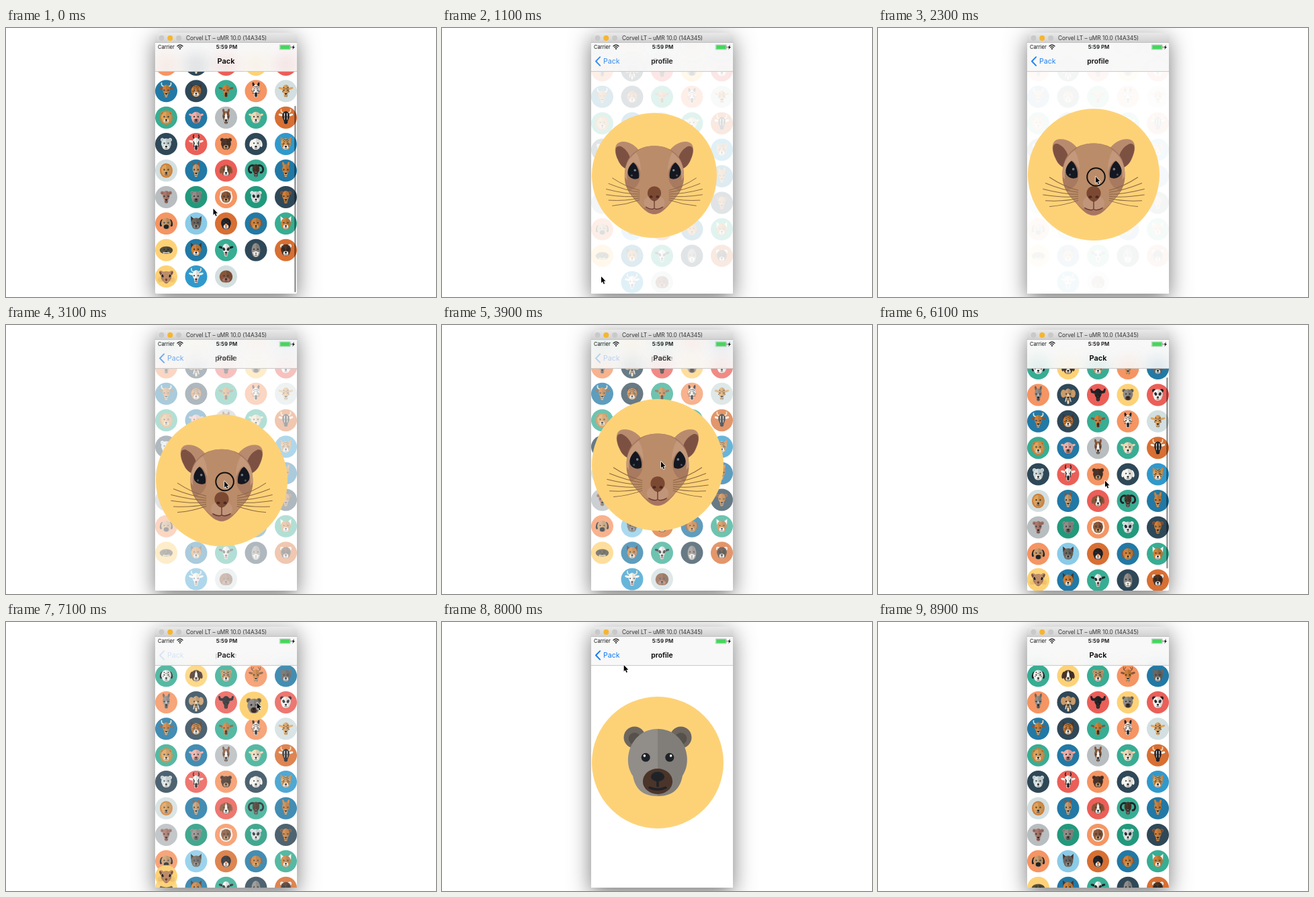
Recreate the animation shown at these times as an HTML page with a canvas. Size 640x400 px, loop 9000 ms.

```html
<!DOCTYPE html>
<html lang="en">
<head>
<meta charset="utf-8">
<title>Animal pack</title>
<style>
html, body { margin: 0; width: 100%; height: 100%; overflow: hidden; background: #fff; }
canvas { display: block; }
</style>
</head>
<body>
<canvas id="stage" width="640" height="400"></canvas>
<script>
const c = document.getElementById('stage').getContext('2d');
const LOOP = 9000, SQUIRREL = 45, HYENA = 8;

const ink = {
  teal: '#38ad93', green: '#22997c', yellow: '#fdd277', orange: '#f59563', rust: '#d86f33',
  blue: '#2279a5', azure: '#3099cc', sky: '#8acbe8', navy: '#2f4858', red: '#eb5f58',
  grey: '#b8bdc0', pale: '#d3dfe0', white: '#f6f4ef', cream: '#ecd9b8', tan: '#c99b6b',
  gold: '#dfa35c', ginger: '#cf8039', brown: '#87563a', dark: '#4b3429', black: '#1f2328',
  ash: '#918d89', stone: '#6d665f', pink: '#f0aea8', olive: '#55503f', clay: '#ab776a'
};

// disc, head, muzzle, head shape, ears, ear colour, marks
const animals = `teal white white round drop black spots
yellow dark cream round drop dark blaze
teal tan white round round tan spots
orange ginger cream long side brown antlers
blue stone pale round point stone
orange ash stone long tall stone tusk
navy tan tan long flap tan trunk
red black dark long side black bull
yellow ash dark round round stone
red white white round round black mask
blue ginger cream long side brown horns
navy ginger white round point dark stripes
teal ginger dark long side brown
orange white black long tall black stripes
pale gold cream long side gold spots
teal gold cream round round ginger mane
blue pink clay round side pink
grey brown ash long tall brown blaze
teal cream white round side cream
rust black black long side white stripe horns
navy pale white round round pale
red white black long side white stripe spears
orange dark tan round round dark
navy white white round drop white
azure gold white round point ginger stripes
pale gold tan round none brown mane
blue tan cream long tall brown
red brown white round drop brown blaze
teal dark ash long none dark ram
blue ginger cream long tall ginger
grey clay clay long round clay
green ash stone round round ash
orange brown tan round round white ruff
green pale white round round white mask
navy ginger tan long round brown
orange tan black round drop black
sky stone ash round point dark
rust black white round none black beak
blue ginger gold round drop brown
teal ginger white round point white
yellow olive olive wide none olive teeth
blue ginger white round point dark
teal white pink long side black mask
navy ash white cone none ash teeth
rust dark white round round white mask
yellow squirrel
azure white pink long side white horns
pale brown clay big none brown`.split('\n').map(line => line.split(' '));

const mix = (a, b, p) => a + (b - a) * p;
const smooth = p => p * p * (3 - 2 * p);

// Interpolates keys of the form [time, value, ...].
function track(t, ...keys) {
  let from = keys[0];
  for (const to of keys) {
    if (t < to[0]) {
      const p = (t - from[0]) / (to[0] - from[0]);
      return from.slice(1).map((v, i) => mix(v, to[i + 1], p));
    }
    from = to;
  }
  return from.slice(1);
}

function oval(color, x, y, rx, ry = rx, turn = 0) {
  c.fillStyle = ink[color] || color;
  c.beginPath();
  c.ellipse(x, y, rx, ry, turn, 0, 7);
  c.fill();
}
function shape(color, path) {
  c.fillStyle = ink[color] || color;
  c.fill(new Path2D(path));
}
function line(color, width, path) {
  c.strokeStyle = ink[color] || color;
  c.lineWidth = width;
  c.stroke(new Path2D(path));
}
function box(color, x, y, w, h, radius = 0) {
  c.fillStyle = color;
  c.beginPath();
  c.roundRect(x, y, w, h, radius);
  c.fill();
}
function text(words, x, y, font, color, align = 'center', alpha = 1) {
  c.save();
  c.globalAlpha *= alpha;
  c.font = font + ' Inter, "Liberation Sans", sans-serif';
  c.fillStyle = color;
  c.textAlign = align;
  c.fillText(words, x, y);
  c.restore();
}
function pair(draw) {
  for (const side of [1, -1]) {
    c.save();
    c.scale(side, 1);
    draw();
    c.restore();
  }
}

// half width, half height, jaw width as a share of the width
const heads = {
  round: [7.3, 8.4, 0.85], long: [5.8, 9.5, 0.5], wide: [9, 5.5, 1],
  cone: [6, 10.5, 1], big: [9, 9, 1]
};
const halfHead = (w, h, jaw) => `M0 ${-h}C${w * 0.9} ${-h} ${w * 1.25} ${-h * 0.1} ${w * jaw} ${h * 0.4}` +
  `C${w * jaw * 0.9} ${h * 0.8} ${w * 0.5} ${h} 0 ${h}Z`;

const ears = {
  round: k => { oval(k, 5.8, -6.3, 2.7); oval('#0003', 5.8, -6, 1.5); },
  point: k => shape(k, 'M2-6L8-11L7.5-2Z'),
  side: k => oval(k, 7.5, -4, 3.4, 1.6, -0.3),
  drop: k => oval(k, 7, -1, 2.4, 5.5, -0.25),
  tall: k => oval(k, 3.5, -9, 1.6, 4.2, 0.25),
  flap: k => oval(k, 7, -2, 4, 6),
  none: () => {}
};

const behind = {
  mane: () => oval('ginger', 0, 0, 9.5, 10.8),
  ruff: () => oval('white', 0, 0, 9.8, 10.3),
  horns: () => pair(() => line('cream', 1.8, 'M2-7Q8-7 7-12')),
  bull: () => pair(() => line('black', 3, 'M1-6Q9-2 10-8')),
  spears: () => pair(() => line('black', 1.5, 'M1.5-7Q6-10 3.5-13.5')),
  ram: () => pair(() => line('black', 2.8, 'M2-7C12-11 13 3 7 3')),
  antlers: () => pair(() => line('brown', 1.2, 'M2-7Q8-8 6.5-13M6-9L3.5-12.5'))
};

const marks = {
  spots: () => pair(() => { oval('dark', 3, -5, 0.9); oval('dark', 4.6, 1, 0.8); oval('dark', 1, -3.5, 0.6); }),
  stripes: () => pair(() => line('dark', 0.9, 'M0-6L3-7M1-3.5L4-5M3 1L6 0M2.5 3.5L5 3')),
  stripe: () => pair(() => { line('white', 1.2, 'M2-6L2.4 3'); line('black', 1.2, 'M3.8-4L3 4'); }),
  blaze: () => shape('white', 'M0-8L1.8-3L2.5 6H-2.5L-1.8-3Z'),
  mask: () => pair(() => oval('black', 3.2, -1.4, 1.9, 2.5, 0.5)),
  trunk: () => { line('cream', 3, 'M0 0V12'); pair(() => line('white', 1.2, 'M3 5L4 10')); },
  tusk: () => shape('pale', 'M-1.5 4L0-3L1.5 4Z')
};

const over = {
  teeth: () => shape('white', 'M-5 3L-4 6L-3 3L-2 6L-1 3L0 6L1 3L2 6L3 3L4 6L5 3Z'),
  beak: () => shape('orange', 'M-2 1L0 0L2 1L0 6Z')
};

function animal([, head, muzzle, form, ear, earColor, ...extras]) {
  const apply = set => extras.forEach(name => set[name] && set[name]());
  const [w, h, jaw] = heads[form];
  apply(behind);
  pair(() => ears[ear](earColor));
  pair(() => shape(head, halfHead(w, h, jaw)));
  line(head, 0.6, `M0 ${0.5 - h}V${h - 0.5}`);
  shape('#0000001c', halfHead(w, h, jaw));
  apply(marks);
  oval(muzzle, 0, h * 0.56, w * jaw * 0.6, h * 0.38);
  pair(() => { oval('black', 3, -1.3, 1.1); oval('#fff', 3.3, -1.7, 0.3); });
  oval('black', 0, h * 0.42, 1.7, 1.2);
  line('black', 0.6, `M0 ${h * 0.45}V${h * 0.7}M-2 ${h * 0.75}Q0 ${h * 0.85} 2 ${h * 0.75}`);
  apply(over);
}

function squirrel() {
  c.scale(16.5 / 97, 16.5 / 97);
  pair(() => {
    shape('#b98b6e', 'M22-36C28-46 40-54 52-52C63-50 62-36 57-25C53-14 45-9 38-10Z');
    shape('#7d5142', 'M38-10C34-22 38-38 52-45C63-48 61-34 56-24C52-14 45-9 38-10Z');
  });
  shape('#a87a5f', 'M0-46C29-46 47-28 46 2C46 22 35 32 25 43C16 54 9 60 0 60C-9 60-16 54-25 43C-35 32-46 22-46 2C-47-28-29-46 0-46Z');
  shape('#bb8c69', 'M0-46C15-46 26-40 31-32C22-24 20-8 23 8C27 20 36 22 39 24C32 36 22 45 17 50H-17C-22 45-32 36-39 24C-36 22-27 20-23 8C-20-8-22-24-31-32C-26-40-15-46 0-46Z');
  oval('#c0957a', 0, 42, 16, 12);
  shape('#a87462', 'M-14 50Q0 55 14 50Q8 60 0 60Q-8 60-14 50Z');
  pair(() => {
    shape('#c3987b', 'M28-36C41-27 46-14 46 2L42 8C44-6 38-18 32-21Q25-17 21-4Q20-22 28-36Z');
    shape('#14171f', 'M24 4C22-6 28-18 33-20C40-14 43-6 40 0C36 6 29 7 24 4Z');
    oval('#77808d', 30, -8, 1.8);
    oval('#4a5361', 35, 0, 1.5);
    let hairs = '';
    for (let i = 0; i < 6; i++) {
      hairs += `M23 ${23 + 3 * i}Q44 ${18 + 5.5 * i} ${65 + 10 * Math.sin(i * 0.63)} ${4 + 8.6 * i}`;
    }
    line('#8c6641', 1, hairs);
  });
  shape('#7b4932', 'M0 17C8 17 12 24 10 31Q6 39 0 40Q-6 39-10 31C-12 24-8 17 0 17Z');
  pair(() => oval('#4b291f', 5, 33, 2.5, 2));
  line('#63382b', 1.3, 'M0 39V51M-13 49Q-5 54 0 51Q5 54 13 49');
}

function disc(i, x, y, r) {
  oval(animals[i][0], x, y, r);
}
function badge(i, x, y, r = 16.5) {
  disc(i, x, y, r);
  c.save();
  c.translate(x, y);
  c.scale(r / 16.5, r / 16.5);
  animals[i][1] === 'squirrel' ? squirrel() : animal(animals[i]);
  c.restore();
}
function grid(scroll, draw) {
  animals.forEach((_, i) => {
    const x = 238.5 + 44.5 * (i % 5), y = 80 + 39.4 * Math.floor(i / 5) - scroll;
    if (y > 20 && y < 415) draw(i, x, y, 16.5);
  });
}
// Grows a badge from its cell to the profile picture.
function zoom(i, x, y, p, shift = 0) {
  const e = smooth(p);
  badge(i, mix(x, 321, e), mix(y, 209, e) + shift, mix(16.5, 98, e));
}
function clipped(x, y, w, h, draw) {
  c.save();
  c.beginPath();
  c.rect(x, y, w, h);
  c.clip();
  draw();
  c.restore();
}

function frame() {
  c.save();
  c.shadowColor = 'rgba(0,0,0,.52)';
  c.shadowBlur = 32;
  c.shadowOffsetY = 9;
  box('#fff', 222, 7, 211, 388, [4, 4, 2, 2]);
  c.restore();
  const bar = c.createLinearGradient(0, 7, 0, 22);
  bar.addColorStop(0, '#e9e9e9');
  bar.addColorStop(1, '#d0d0d0');
  box(bar, 222, 7, 211, 15, [4, 4, 0, 0]);
  line('#b4b4b4', 0.7, 'M222 21.7H433');
  ['#c9c9c9', '#f6b52e', '#c9c9c9'].forEach((k, i) => oval(k, 231.5 + 12.8 * i, 15, 4));
  text('Corvel LT – uMR 10.0 (14A345)', 328, 18, '8.3px', '#333');
}

function statusBar() {
  text('Carrier', 226, 31, '7.6px', '#111', 'left');
  line('#111', 1.2, 'M255 27Q259 23.2 263 27M256.7 28.9Q259 26.7 261.3 28.9');
  oval('#111', 259, 30.8, 1.1);
  text('5:59 PM', 328.5, 31, '600 7.9px', '#111');
  c.strokeStyle = '#999';
  c.lineWidth = 0.5;
  c.strokeRect(407.7, 25, 15.4, 7);
  box('#45d65c', 408.2, 25.5, 14.4, 6);
  box('#777', 423.6, 27.3, 1.1, 2.4);
  shape('#111', 'M428.8 25L425.3 29.2H427.3L426.3 32.2L430 27.9H427.9Z');
}

function navBar(scroll, p) {
  clipped(222, 22, 211, 43, () => {
    box('#f8f8f8', 222, 22, 211, 43);
    c.save();
    c.filter = 'blur(11px)';
    c.globalAlpha = 0.15 * (1 - p);
    grid(scroll, disc);
    c.restore();
  });
  line('#b5b5b5', 0.7, 'M222 64.6H433');
  statusBar();
  text('Pack', 327.5, 53.2, '600 11px', '#000', 'center', 1 - p);
  text('profile', 327.5, 53.2, '600 10.4px', '#000', 'center', p);
  text('Pack', 240, 53.2, '10.6px', '#1379f0', 'left', p);
  c.save();
  c.globalAlpha = p;
  line('#1379f0', 1.9, 'M235.2 43.2L229 49.5L235.2 55.8');
  c.restore();
}

function pointer(x, y, pressed) {
  if (pressed) {
    c.beginPath();
    c.arc(x + 0.5, y + 0.5, 13.3, 0, 7);
    c.strokeStyle = '#111';
    c.lineWidth = 2;
    c.stroke();
  }
  c.save();
  c.translate(x, y);
  const arrow = 'M0 0V9.4L2.1 7.5L3.7 11.2L5.2 10.5L3.6 7H6.5Z';
  line('#fff', 1.5, arrow);
  shape('#000', arrow);
  c.restore();
}

function draw(t) {
  const [scroll] = track(t, [0, 65], [200, 60], [500, 56.5], [4900, 56.5], [5500, 42], [6100, 15.5], [6500, 0]);
  const [fade] = track(t, [0, 0], [675, 0], [1175, 1], [2200, 1], [2300, 0.95], [3900, 0.27], [4250, 0],
    [7025, 0], [7525, 1], [8200, 1], [8700, 0]);
  const [grown] = track(t, [0, 0], [675, 0], [1175, 1], [3900, 1], [4350, 0]);
  const [drag] = track(t, [0, 0], [2200, 0], [2300, 9], [3000, 25], [3900, -1], [4350, 0]);
  const [barAlpha] = track(t, [0, 0.5], [500, 0.5], [800, 0], [4800, 0], [4950, 0.5], [6600, 0.5], [6900, 0]);
  const [x, y] = track(t, [0, 308.5, 268.5], [600, 237, 369.5], [1200, 237, 369.5], [2000, 323.5, 212],
    [2200, 323.5, 212], [2300, 324, 221], [3000, 325, 236], [3900, 326, 203], [4800, 338, 231.5],
    [6200, 338, 231.5], [6800, 373.5, 120], [7600, 373.5, 120], [8100, 245, 50]);
  const squirrelOut = t >= 675 && t < 7525, hyenaOut = t >= 7025 && t < 8700;
  const pressed = (t >= 550 && t < 680) || (t >= 2200 && t < 3850) || (t >= 6900 && t < 7025);

  c.clearRect(0, 0, 640, 400);
  frame();
  clipped(222, 65, 211, 330, () => {
    grid(scroll, (i, gx, gy) => {
      const away = (i === SQUIRREL && squirrelOut) || (i === HYENA && hyenaOut);
      if (!away) badge(i, gx, gy);
    });
    // A white veil fades the grid evenly.
    box(`rgba(255,255,255,${fade})`, 222, 65, 211, 330);
    if (squirrelOut) zoom(SQUIRREL, 238.5, 378, grown, drag);
    if (hyenaOut) zoom(HYENA, 372, 119.4, fade);
    const top = 66.3 + 0.76 * scroll;
    box(`rgba(0,0,0,${barAlpha})`, 429.4, top, 2, Math.min(393, top + 284) - top, 1);
  });
  navBar(scroll, fade);
  if (t < 8800) pointer(x, y, pressed);
}

c.lineCap = 'round';
c.lineJoin = 'round';
const start = performance.now();
function tick() {
  const elapsed = performance.now() - start + 10;
  draw(Math.floor(elapsed / 100) * 100 % LOOP);
  requestAnimationFrame(tick);
}
tick();
</script>
</body>
</html>
```
